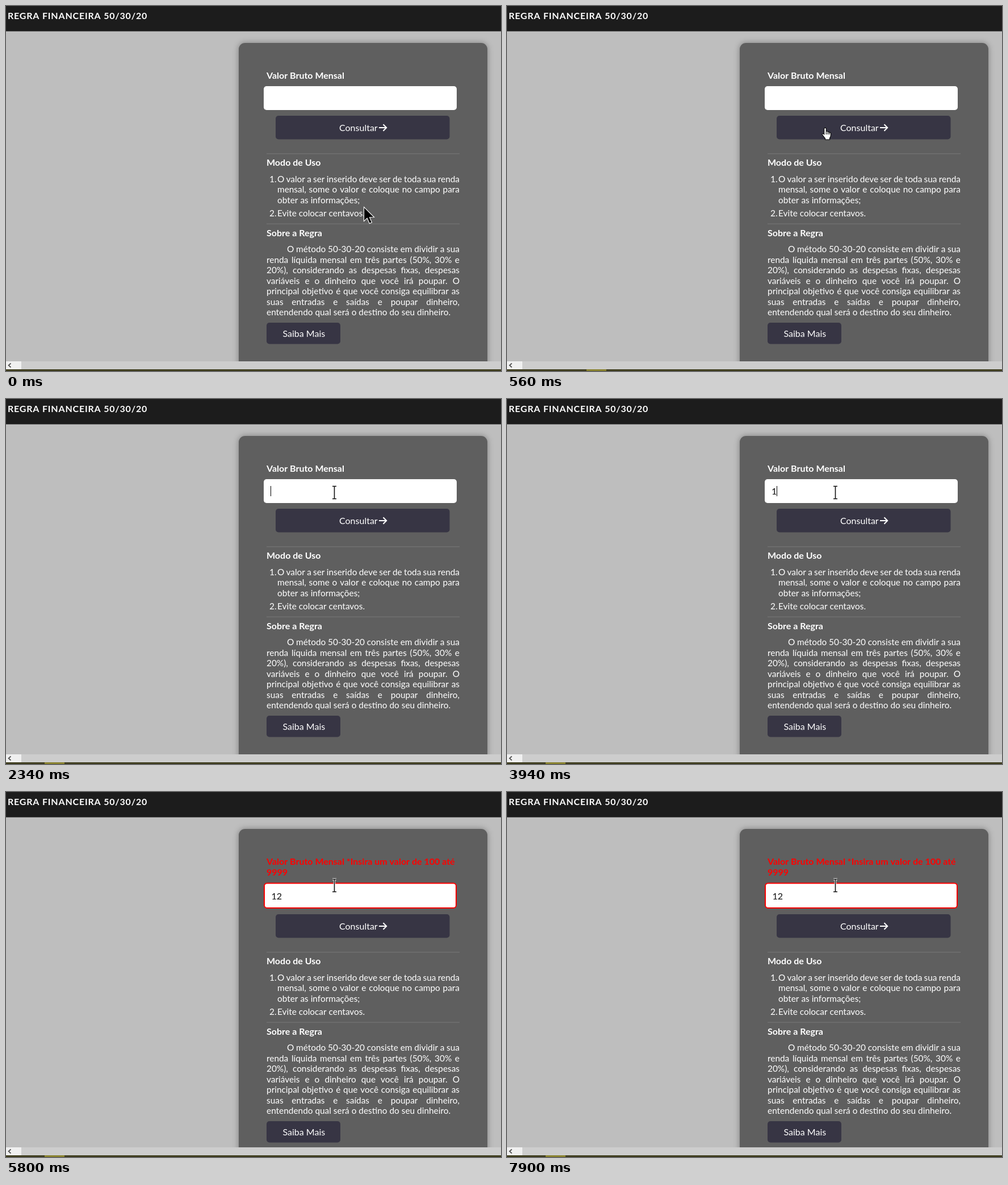
These frames come from a looping animation (872x642 px, 8 s). An HTML page with a canvas:

```html
<!DOCTYPE html>
<html lang="pt-BR">
<head>
<meta charset="utf-8">
<title>Regra Financeira</title>
<style>
html, body { margin: 0; width: 100%; height: 100%; overflow: hidden; background: #bebebe; }
canvas { display: block; }
</style>
</head>
<body>
<canvas id="stage" width="872" height="642"></canvas>
<script>
const ctx = document.getElementById('stage').getContext('2d');
const LOOP = 8000;
const FACE = 'Lato, "Open Sans", sans-serif';
const NORMAL = `400 15.4px ${FACE}`;
const BUTTON = `400 16px ${FACE}`;
const BOLD = `700 16px ${FACE}`;
const LEFT = 459, RIGHT = 799, LINE = 18.5;

const steps = [
  'O valor a ser inserido deve ser de toda sua renda',
  'mensal, some o valor e coloque no campo para',
  'obter as informações;'
];
const about = [
  'O método 50-30-20 consiste em dividir a sua',
  'renda líquida mensal em três partes (50%, 30% e',
  '20%), considerando as despesas fixas, despesas',
  'variáveis e o dinheiro que você irá poupar. O',
  'principal objetivo é que você consiga equilibrar as',
  'suas entradas e saídas e poupar dinheiro,',
  'entendendo qual será o destino do seu dinheiro.'
];

// Times at which the text caret flips, starting hidden.
const blinks = [1350, 1840, 2340, 2880, 3430, 4760, 5270, 5800, 6340, 6870, 7360, 7900];

function rect(x, y, w, h, color) {
  ctx.fillStyle = color;
  ctx.fillRect(x, y, w, h);
}

function box(x, y, w, h, r, color) {
  ctx.beginPath();
  ctx.roundRect(x, y, w, h, r);
  ctx.fillStyle = color;
  ctx.fill();
}

function text(str, x, y, font, color = '#fff', spacing = '0px') {
  ctx.font = font;
  ctx.fillStyle = color;
  ctx.letterSpacing = spacing;
  ctx.fillText(str, x, Math.round(y));
  ctx.letterSpacing = '0px';
}

function justify(str, x, right, y) {
  ctx.font = NORMAL;
  const words = str.split(' ');
  const widths = words.map(w => ctx.measureText(w).width);
  const gap = (right - x - widths.reduce((a, b) => a + b)) / (words.length - 1);
  words.forEach((w, i) => {
    text(w, x, y, NORMAL);
    x += widths[i] + gap;
  });
}

function paragraph(lines, x, y, indent) {
  lines.forEach((line, i) => {
    const start = x + (i ? 0 : indent);
    if (i < lines.length - 1) justify(line, start, RIGHT, y + i * LINE);
    else text(line, start, y + i * LINE, NORMAL);
  });
}

function polyline(points, close) {
  ctx.beginPath();
  points.forEach(([x, y]) => ctx.lineTo(x, y));
  if (close) ctx.closePath();
}

function drawChrome(t) {
  rect(0, 0, 872, 44.5, '#1c1c1c');
  text('REGRA FINANCEIRA 50/30/20', 3, 23, BOLD, '#fff', '0.8px');
  rect(0, 625, 872, 14, '#cdcdcd');
  rect(0, 625, 27, 14, '#f0f0f0');
  polyline([[8.5, 628.5], [4.5, 632], [8.5, 635.5]]);
  ctx.strokeStyle = '#505050';
  ctx.lineWidth = 1.7;
  ctx.stroke();
  rect(0, 639, 872, 3, '#403e20');
  if (t >= 400) rect(t < 1270 ? 140 : 68, 639, 35, 3, '#89822f');
}

function drawCard() {
  ctx.save();
  ctx.shadowColor = 'rgba(0,0,0,0.35)';
  ctx.shadowBlur = 11;
  box(410, 65, 438, 640, 11, '#5f5f5f');
  ctx.restore();
}

function drawField(t, error) {
  const value = t < 3940 ? '' : t < 4220 ? '1' : '12';
  const flips = blinks.filter(b => b <= t).length;
  const caret = flips % 2 === 1;
  if (error) {
    text('Valor Bruto Mensal *Insira um valor de 100 até', LEFT, 128, BOLD, '#f00');
    text('9999', LEFT, 147, BOLD, '#f00');
    box(454, 159.5, 340, 45.5, 6, '#f00');
    box(456, 161.5, 336, 41.5, 4, '#fff');
  } else {
    text('Valor Bruto Mensal', LEFT, 128, BOLD);
    box(454, 141, 340, 42, 5, '#fff');
  }
  text(value, error ? 467.5 : 466, error ? 189 : 168, BUTTON, '#111');
  if (caret) {
    const x = value === '12' ? 485 : value ? (error ? 476 : 475) : 466;
    rect(x, error ? 173 : 153, 1, error ? 19 : 18, '#000');
  }
}

function drawBody(shift) {
  const dark = '#373544';
  const top = Math.floor(shift);
  box(475, 193 + top, 306.5, 41.5, 5, dark);
  text('Consultar', 587, 220 + shift, BUTTON);
  const ay = 214 + top;
  ctx.strokeStyle = '#fff';
  ctx.lineWidth = 2;
  polyline([[657, ay], [670, ay]]);
  ctx.stroke();
  polyline([[664.5, ay - 5.7], [670.2, ay], [664.5, ay + 5.7]]);
  ctx.stroke();

  rect(LEFT, 259 + top, 340, 1.5, '#707070');
  text('Modo de Uso', LEFT, 281 + shift, BOLD);
  text('1.', 464, 309.5 + shift, NORMAL);
  paragraph(steps, 478, 309.5 + shift, 0);
  text('2.', 464, 370 + shift, NORMAL);
  text('Evite colocar centavos.', 478, 370 + shift, NORMAL);

  rect(LEFT, 382.5 + top, 340, 1.5, '#707070');
  text('Sobre a Regra', LEFT, 404.5 + shift, BOLD);
  paragraph(about, LEFT, 433 + shift, 36);
  box(LEFT, 557 + top, 130, 37.5, 5, dark);
  text('Saiba Mais', 487.5, 582 + shift, BUTTON);
}

function drawArrow() {
  polyline([[0, 0], [0, 25], [5.7, 19.7], [9.8, 29], [14, 27.2], [10, 18.2], [18, 18]], true);
  ctx.fillStyle = '#000';
  ctx.fill();
  ctx.strokeStyle = '#fff';
  ctx.lineWidth = 1.1;
  ctx.stroke();
}

function drawHand() {
  ctx.beginPath();
  ctx.moveTo(-1.8, 11);
  ctx.lineTo(-1.8, 1.6);
  ctx.quadraticCurveTo(0, -1.4, 1.8, 1.6);
  ctx.lineTo(1.8, 7);
  ctx.quadraticCurveTo(4, 5.6, 5, 7.8);
  ctx.quadraticCurveTo(7, 6.6, 7.8, 8.8);
  ctx.quadraticCurveTo(10, 8, 10, 11);
  ctx.lineTo(9.5, 15.5);
  ctx.lineTo(8, 18.5);
  ctx.lineTo(8, 21);
  ctx.lineTo(0, 21);
  ctx.lineTo(0, 19);
  ctx.lineTo(-5, 12.5);
  ctx.quadraticCurveTo(-5.5, 9, -1.8, 11.8);
  ctx.closePath();
  ctx.fillStyle = '#fff';
  ctx.fill();
  ctx.strokeStyle = '#000';
  ctx.lineWidth = 1.1;
  ctx.stroke();
  ctx.beginPath();
  for (const x of [1.8, 4.8, 7.5]) {
    ctx.moveTo(x, 8);
    ctx.lineTo(x, 12);
  }
  ctx.stroke();
}

function drawBeam() {
  for (const [color, width] of [['#fff', 3.4], ['#111', 1.6]]) {
    ctx.strokeStyle = color;
    ctx.lineWidth = width;
    ctx.beginPath();
    for (const y of [-11, 11]) {
      ctx.moveTo(-3.5, y);
      ctx.lineTo(3.5, y);
    }
    ctx.moveTo(0, -11);
    ctx.lineTo(0, 11);
    ctx.stroke();
  }
}

function pointerAt(t) {
  if (t >= 1140) return [578.5, 164.5];
  const track = [[190, 630.5, 353.5], [560, 560.5, 214], [970, 586.5, 167]];
  const tick = 780 / 19;
  const now = Math.min(970, 190 + Math.floor(Math.max(0, t - 190) / tick + 0.05) * tick);
  const [a, b] = now < 560 ? track : track.slice(1);
  const p = (now - a[0]) / (b[0] - a[0]);
  const e = p * p * (3 - 2 * p);
  return [a[1] + (b[1] - a[1]) * e, a[2] + (b[2] - a[2]) * e];
}

function drawPointer(t) {
  const [x, y] = pointerAt(t);
  const overText = y < 183 || (y > 295 && y < 350 && x < 622);
  const overButton = y > 193 && y < 235;
  ctx.save();
  ctx.translate(x, y);
  if (overText) drawBeam();
  else if (overButton) drawHand();
  else drawArrow();
  ctx.restore();
}

function draw(t) {
  const error = t >= 4060;
  rect(0, 0, 872, 642, '#bebebe');
  drawCard();
  drawField(t, error);
  drawBody(error ? 22.4 : 0);
  drawChrome(t);
  drawPointer(t);
}

let start;
function frame(now) {
  start ??= now;
  draw((now - start) % LOOP);
  requestAnimationFrame(frame);
}
requestAnimationFrame(frame);
</script>
</body>
</html>
```
